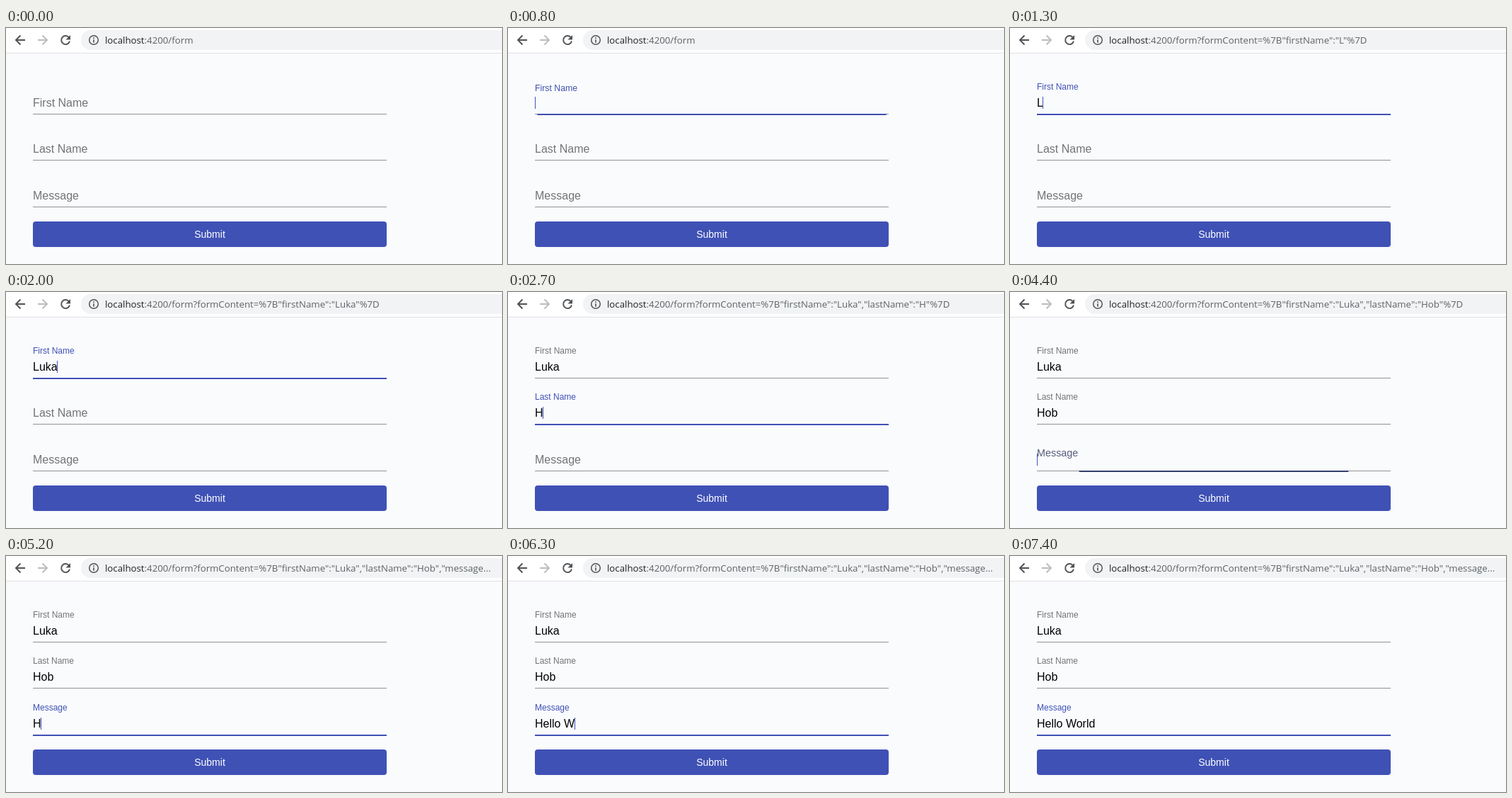
Animation, 701 px wide and 333 px high, one loop 8 s. Source, as an HTML page:

```html
<!DOCTYPE html>
<html lang="en">
<head>
<meta charset="utf-8">
<title>Form state in the URL</title>
<style>
  html, body { margin: 0; height: 100%; overflow: hidden; background: #fafbfd; }
  svg { display: block; }
  text { font: 16px "Liberation Sans", Arial, sans-serif; white-space: pre; }
  .url { font: 13.25px "Open Sans", "Noto Sans", sans-serif; fill: #5f6368; }
  .host { fill: #202124; }
  .submit { font-size: 14px; fill: #fff; text-anchor: middle; }
  .icon { fill: none; stroke: #4f5256; stroke-width: 1.9; }
</style>
</head>
<body>
<svg id="stage" width="701" height="333" viewBox="0 0 701 333">
  <rect width="701" height="35" fill="#fff"/>
  <rect y="35" width="701" height="1" fill="#dfe1e4"/>
  <rect x="106" y="3" width="640" height="28" rx="14" fill="#f1f3f4"/>
  <path class="icon" d="M27 17H14.5M20.5 10.5L14 17l6.500 6.500"/>
  <path class="icon" style="stroke:#babcbe" d="M45 17h12.500M51.500 10.500L58 17l-6.500 6.500"/>
  <path class="icon" d="M89 13.500A6 6 0 1 0 90 18.500"/>
  <path fill="#4f5256" d="M91 10v6.500h-6.500z"/>
  <circle class="icon" style="stroke-width:1.500" cx="124" cy="17" r="6.300"/>
  <path class="icon" style="stroke-width:1.600" d="M124 13.300v1.600M124 16.200v4.500"/>
  <text class="url" x="140" y="22"><tspan class="host">localhost</tspan><tspan id="path"></tspan></text>
  <rect x="38" y="273" width="500" height="36" rx="4" fill="#3f51b5"/>
  <text class="submit" x="288" y="296">Submit</text>
</svg>
<script>
const LOOP = 8000, STEP = 100, URL_LAG = 40;
const CARET_ON = 490, CARET_CYCLE = 1000;
const LEFT = 38, WIDTH = 500;
const PRIMARY = [63, 81, 181, 1];

const fields = [
  { label: 'First Name', key: 'firstName', line: 121, focus: 610, blur: 2250,
    text: 'Luka', typed: [1250, 1450, 1690, 1890] },
  { label: 'Last Name', key: 'lastName', line: 186, focus: 2250, blur: 4290,
    text: 'Hob', typed: [2650, 3050, 3190] },
  { label: 'Message', key: 'message', line: 252, focus: 4350, blur: LOOP,
    text: 'Hello World',
    typed: [5150, 5350, 5450, 5650, 5850, 6050, 6250, 6450, 6550, 6750, 6910] }
];

const stage = document.getElementById('stage');
const path = document.getElementById('path');

function set(el, attrs) {
  for (const name in attrs) el.setAttribute(name, attrs[name]);
}

function add(tag, attrs, content = '') {
  const el = document.createElementNS('http://www.w3.org/2000/svg', tag);
  set(el, attrs);
  el.textContent = content;
  return stage.appendChild(el);
}

// cubic-bezier(.25, .8, .25, 1), solved by bisection
function ease(x) {
  if (x <= 0) return 0;
  if (x >= 1) return 1;
  const curve = (a, b, s) => 3 * (1 - s) ** 2 * s * a + 3 * (1 - s) * s * s * b + s ** 3;
  let low = 0, high = 1;
  for (let i = 0; i < 20; i++) {
    const mid = (low + high) / 2;
    if (curve(.25, .25, mid) < x) low = mid; else high = mid;
  }
  return curve(.8, 1, low);
}

function blend(alpha, p) {
  const from = [0, 0, 0, alpha];
  return `rgba(${PRIMARY.map((c, i) => from[i] + (c - from[i]) * p)})`;
}

function valueAt(field, t) {
  return field.text.slice(0, field.typed.filter(k => k <= t).length);
}

function pathAt(t) {
  const filled = fields.filter(f => valueAt(f, t));
  if (!filled.length) return ':4200/form';
  const pairs = filled.map(f => `"${f.key}":"${valueAt(f, t)}"`).join(',');
  const full = `:4200/form?formContent=%7B${pairs}%7D`;
  const cut = full.indexOf('"message');
  return cut < 0 ? full : full.slice(0, cut) + '"message...';
}

for (const f of fields) {
  add('rect', { x: LEFT, y: f.line, width: WIDTH, height: 1, fill: 'rgba(0,0,0,.42)' });
  f.ripple = add('rect', { y: f.line, height: 2 });
  f.labelEl = add('text', {}, f.label);
  f.input = add('text', { x: LEFT, y: f.line - 10, fill: '#000' });
  f.caret = add('rect', { y: f.line - 24, width: 1, height: 17, fill: '#3f51b5' });
}

function drawField(f, t) {
  const since = t - f.focus;
  const focused = since >= 0 && t < f.blur;
  const rise = ease(since / 400), spread = ease(since / 300);

  set(f.labelEl, {
    transform: `translate(${LEFT} ${f.line - 10 - 24 * rise}) scale(${1 - rise / 4})`,
    fill: blend(.54, focused ? rise : 0)
  });

  const width = WIDTH * (.5 + spread / 2);
  set(f.ripple, {
    x: LEFT + (WIDTH - width) / 2, width,
    fill: blend(.87, spread),
    opacity: focused ? ease(since / 100) : 0
  });

  f.input.textContent = valueAt(f, t);
  const lastAction = Math.max(f.focus, ...f.typed.filter(k => k <= t));
  const lit = focused && (t - lastAction) % CARET_CYCLE < CARET_ON;
  set(f.caret, {
    x: Math.floor(LEFT + f.input.getComputedTextLength()),
    opacity: lit ? 1 : 0
  });
}

function draw() {
  const t = Math.floor(performance.now() % LOOP / STEP) * STEP;
  path.textContent = pathAt(t - URL_LAG);
  fields.forEach(f => drawField(f, t));
  requestAnimationFrame(draw);
}
draw();
</script>
</body>
</html>
```
